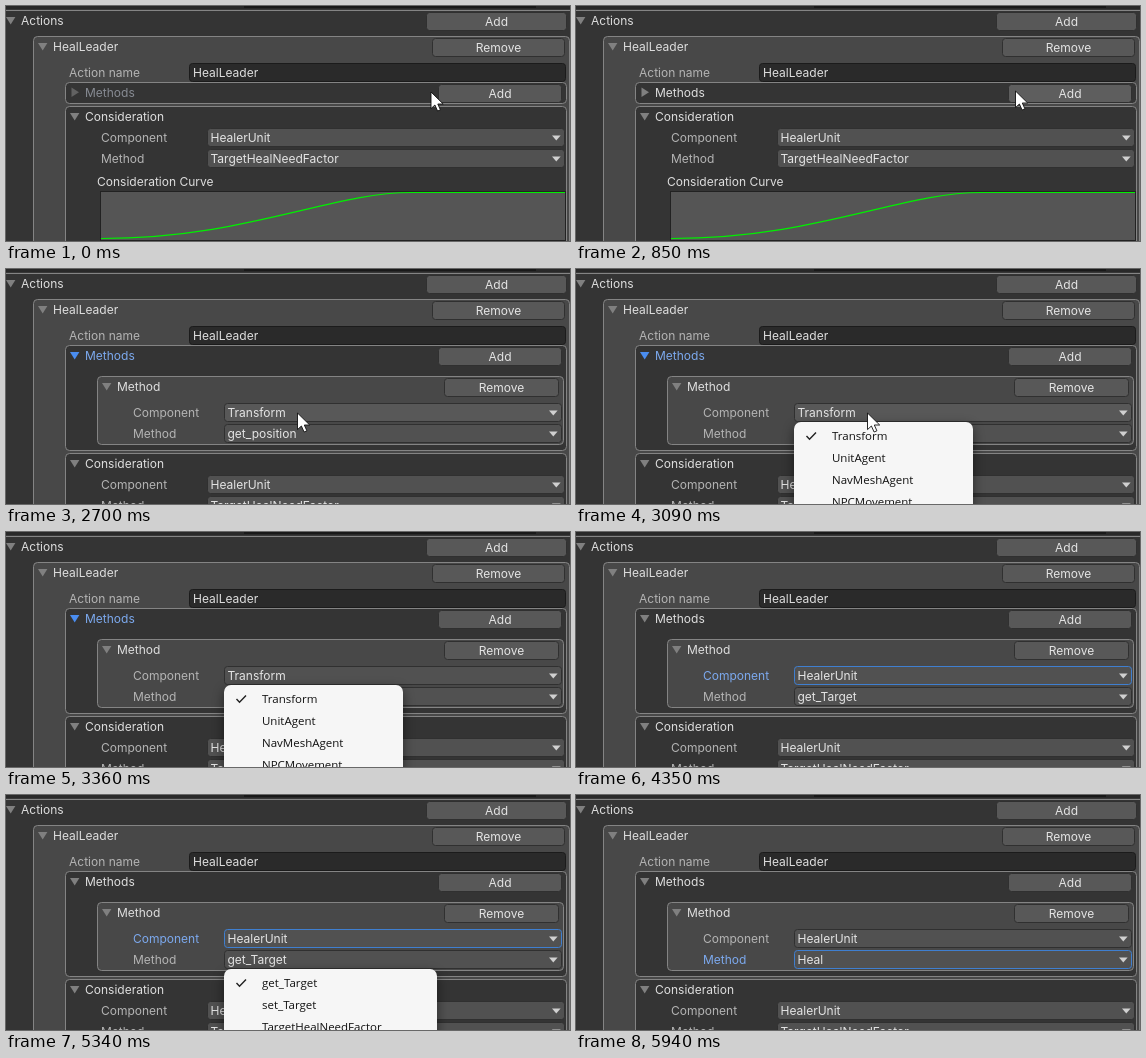
These frames come from a looping animation (564 px wide and 235 px high, 6080 ms). An HTML page:

```html
<!DOCTYPE html>
<html lang="en">
<head>
<meta charset="utf-8">
<title>Inspector</title>
<style>
  html, body { margin: 0; width: 100%; height: 100%; overflow: hidden; background: #383838; }
  svg { display: block; width: 564px; height: 235px; }
  text { font: 12px Inter, sans-serif; white-space: pre; }
  .menu text { font: 11.5px "Open Sans", sans-serif; fill: #111; }
</style>
</head>
<body>
<script>
const LOOP = 6080;
const TEXT = '#dedede', LABEL = '#b4b4b4', DIM = '#878b93', BLUE = '#7ca9ee';
const FIELD = '#515151', FIELD_HOVER = '#585858', BUTTON = '#585858';
const EDGE = '#848484', DARK = '#343434', LIGHT = '#484848';

function el(parent, tag, attrs = {}) {
  const node = document.createElementNS('http://www.w3.org/2000/svg', tag);
  set(node, attrs);
  parent.append(node);
  return node;
}
function set(node, attrs) {
  for (const k in attrs) node.setAttribute(k, attrs[k]);
}
const show = (node, on) => set(node, { opacity: +on });

const rect = (p, x, y, w, h, fill, more) =>
  el(p, 'rect', { x, y, width: w, height: h, fill, ...more });
const box = (p, x, y, w, h, fill) => rect(p, x, y, w, h, fill, { rx: 4, stroke: EDGE });

// y is the vertical middle of the line
function label(p, x, y, str, fill = TEXT, anchor = 'start') {
  const node = el(p, 'text', { x, y: y + 4.4, fill, 'text-anchor': anchor });
  node.textContent = str;
  return node;
}
const openArrow = (p, x, y, fill = '#808080') =>
  el(p, 'path', { d: `M${x} ${y - 3.5}h9.4l-4.7 7.5z`, fill });

function button(p, x, y, w, h, str) {
  const face = rect(p, x + .5, y + .5, w - 1, h - 1, BUTTON, { rx: 3, stroke: '#303030' });
  label(p, x + w / 2, y + h / 2, str, '#e4e4e4', 'middle');
  return face;
}
function dropdown(p, x, y, w, str) {
  const face = rect(p, x + .5, y + .5, w - 1, 18, FIELD, { rx: 3, stroke: '#303030' });
  const value = label(p, x + 3.5, y + 9.5, str, '#e4e4e4');
  el(p, 'path', { d: `M${x + w - 13} ${y + 7.5}h8.6l-4.3 5z`, fill: '#d0d0d0' });
  return { face, value };
}
function menu(x, y, w, items) {
  const g = el(svg, 'g', { class: 'menu', opacity: 0 });
  rect(g, x, y + 4, w, 300, '#000', { rx: 8, opacity: .5, filter: 'url(#soft)' });
  rect(g, x, y, w, 300, '#f6f6f6', { rx: 7 });
  const hover = rect(g, x + 4, y + 4, w - 8, 21, '#e6e6e6', { rx: 4, opacity: 0 });
  items.forEach((s, i) => label(g, x + 38, y + 14 + 22 * i, s));
  el(g, 'path', {
    d: `M${x + 12.5} ${y + 14}l3 3.2l6.5 -6.8`, fill: 'none', stroke: '#222', 'stroke-width': 1.4
  });
  return { g, hover, top: y };
}

const svg = el(document.body, 'svg', { viewBox: '0 0 564 235' });
const soft = el(svg, 'filter', { id: 'soft', x: '-20%', y: '-20%', width: '140%', height: '140%' });
el(soft, 'feGaussianBlur', { stdDeviation: 6 });

// Actions list and its element
rect(svg, 0, 0, 564, 235, '#383838');
rect(svg, 0, 0, 564, 3, '#292929');
rect(svg, 238, 0, 292, 2, '#191919');
box(svg, -5.5, 4.5, 575, 300, DARK);
openArrow(svg, 0, 14.5);
label(svg, 15, 14.5, 'Actions');
button(svg, 420, 6, 141, 19, 'Add');

box(svg, 27.5, 30.5, 536, 300, LIGHT);
openArrow(svg, 32, 40.5);
label(svg, 47, 40.5, 'HealLeader');
button(svg, 426, 32, 133, 19, 'Remove');
label(svg, 63, 66.5, 'Action name', LABEL);
rect(svg, 183.5, 57.5, 376, 18, '#2a2a2a', { rx: 3, stroke: '#1b1b1b' });
label(svg, 187, 66.5, 'HealLeader');

// Methods list
const methodsBox = box(svg, 59.5, 76.5, 501, 21, DARK);
const closedArrow = el(svg, 'path', { d: 'M65.5 81.5v9.4l7.5 -4.7z' });
const opened = el(svg, 'g');
const methodsArrow = openArrow(opened, 64, 86.5);
const methodsLabel = label(svg, 79, 86.5, 'Methods');
const addFace = button(svg, 432, 78, 124, 19, 'Add');

box(opened, 91.5, 107.5, 466, 68, LIGHT);
openArrow(opened, 96, 117.5);
label(opened, 111, 117.5, 'Method');
button(opened, 438, 109, 115, 19, 'Remove');
const compLabel = label(opened, 127, 143.5, 'Component');
const comp = dropdown(opened, 218, 134, 338, 'Transform');
const methLabel = label(opened, 127, 164.5, 'Method');
const meth = dropdown(opened, 218, 155, 338, 'get_position');

// Consideration
const cons = el(svg, 'g');
box(cons, 59.5, 100.5, 501, 300, DARK);
openArrow(cons, 64, 110.5);
label(cons, 79, 110.5, 'Consideration');
label(cons, 95, 131.5, 'Component', LABEL);
dropdown(cons, 201, 122, 358, 'HealerUnit');
label(cons, 95, 152.5, 'Method', LABEL);
dropdown(cons, 201, 143, 358, 'TargetHealNeedFactor');
label(cons, 91, 175.5, 'Consideration Curve');
rect(cons, 94.5, 185.5, 465, 49, '#555', { stroke: '#222' });
el(cons, 'path', {
  d: 'M95 232.5C240 232.5 325 186.5 405 186.5H559',
  fill: 'none', stroke: '#00f000', 'stroke-width': 1.2
});

const compMenu = menu(218, 153, 179, ['Transform', 'UnitAgent', 'NavMeshAgent', 'NPCMovement']);
const methMenu = menu(218, 174, 213, ['get_Target', 'set_Target', 'TargetHealNeedFactor']);

const ring = el(svg, 'circle', { r: 12, fill: '#d2c814', 'fill-opacity': .8 });
const pointer = el(svg, 'path', {
  d: 'M0 0V16.6L3.9 13L6.6 19L9.4 17.8L6.8 12H12.2Z', fill: '#fff', stroke: '#111', 'stroke-width': .9
});

// Pointer moves: start, end, steps, x, y reached, sag of the path
const MOVES = [
  [70, 200, 3, 440, 85.5, 0],
  [400, 400, 1, 439.5, 85, 0],
  [1050, 1640, 10, 65.5, 87, 8],
  [1840, 2430, 10, 278, 149, 0],
  [2500, 2700, 4, 291.5, 144, 0],
  [3160, 3360, 4, 300, 258, 0],
  [4420, 4950, 9, 285, 163.5, 0],
  [5140, 5340, 4, 290, 258, 0]
];
const CLICKS = [[590, 790], [1700, 1840], [2960, 3090], [5010, 5140]];

const ease = u => u * u * (3 - 2 * u);
const within = (t, a, b) => t >= a && t < b;

function pointerAt(t) {
  let x = 425, y = 86;
  for (const [start, end, steps, toX, toY, sag] of MOVES) {
    if (t < start) break;
    const gap = (end - start) / Math.max(1, steps - 1);
    const k = t >= end - 3 ? steps : Math.floor((t - start + 3) / gap) + 1;
    const u = ease(Math.min(1, k / steps));
    x += (toX - x) * u;
    y += (toY - y) * u + sag * Math.sin(Math.PI * u);
  }
  return [x, y];
}

function setMenu(m, alpha, y) {
  show(m.g, 0);
  set(m.g, { opacity: alpha });
  const row = Math.floor((y - m.top - 3) / 22);
  set(m.hover, { y: m.top + 4 + 22 * row, opacity: row >= 0 ? 1 : 0 });
}

function draw(t) {
  const [x, y] = pointerAt(t);
  const isOpen = t >= 1840;
  const compSet = t >= 4350, methSet = t >= 5880;
  const pressed = within(t, 590, 720);

  const focus = within(t, 1700, 4350);
  const tone = focus ? BLUE : t < 720 ? DIM : TEXT;
  set(methodsLabel, { fill: tone });
  set(closedArrow, { fill: focus ? '#4a8df0' : t < 720 ? '#626262' : '#808080' });
  set(methodsArrow, { fill: focus ? '#4a8df0' : '#808080' });
  show(closedArrow, !isOpen);
  show(opened, isOpen);
  set(methodsBox, { height: isOpen ? 105 : 21 });
  set(cons, { transform: `translate(0 ${isOpen ? 84 : 0})` });

  const overAdd = x > 432 && y < 97;
  set(addFace, { fill: pressed ? '#4f657f' : overAdd ? '#5e5e5e' : BUTTON });

  const over = (a, b) => isOpen && x > 218 && y >= a && y < b;
  set(compLabel, { fill: compSet && !methSet ? BLUE : LABEL });
  set(methLabel, { fill: methSet ? BLUE : LABEL });
  set(comp.face, {
    fill: over(134, 153) ? FIELD_HOVER : FIELD,
    stroke: compSet && !methSet ? '#3f7fd0' : '#303030'
  });
  set(meth.face, {
    fill: over(155, 174) ? FIELD_HOVER : FIELD,
    stroke: methSet ? '#3f7fd0' : '#303030'
  });
  comp.value.textContent = compSet ? 'HealerUnit' : 'Transform';
  meth.value.textContent = methSet ? 'Heal' : compSet ? 'get_Target' : 'get_position';

  setMenu(compMenu, within(t, 3030, 4350) ? (t < 3090 ? .6 : 1) : 0, y);
  setMenu(methMenu, within(t, 5080, 5880) ? (t < 5140 ? .6 : 1) : 0, y);

  show(ring, CLICKS.some(([a, b]) => within(t, a, b)));
  set(ring, { cx: x, cy: y });
  set(pointer, { transform: `translate(${x} ${y})` });
}

const begin = performance.now();
function tick() {
  draw((performance.now() - begin) % LOOP);
  requestAnimationFrame(tick);
}
tick();
</script>
</body>
</html>
```
